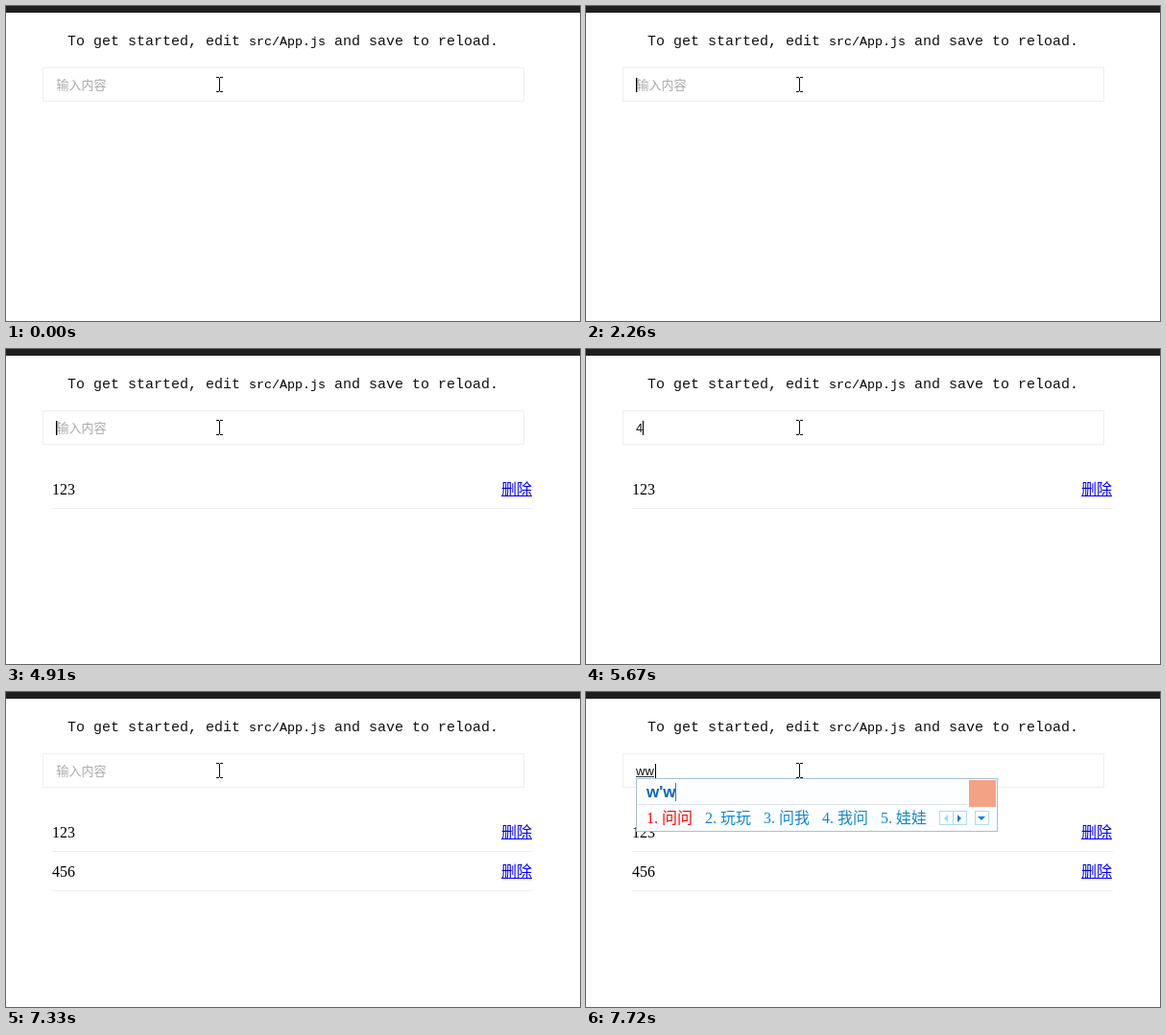
An HTML page that plays this animation: 598x329 px, repeating every 8000 ms.

```html
<!DOCTYPE html>
<html lang="en">
<head>
<meta charset="utf-8">
<title>Todo input</title>
<style>
html, body { margin: 0; width: 100%; height: 100%; overflow: hidden; background: #fff; }
svg { display: block; width: 598px; height: 329px; }
.head { font: 15px "Liberation Mono", monospace; fill: #111; }
.code { font-size: 13.333px; fill: #000; }
.body { font: 16px "Liberation Serif", "Noto Sans CJK SC", "Noto Sans CJK", serif; }
.field { font: 13px "Liberation Sans", "Noto Sans CJK SC", "Noto Sans CJK", sans-serif; }
.pinyin { font: bold 17px "Liberation Sans", sans-serif; }
</style>
</head>
<body>
<svg viewBox="0 0 598 329">
  <rect width="598" height="7" fill="#201e1f"/>
  <g class="head">
    <text x="64" y="41">To get started, edit</text>
    <text x="253" y="41" class="code">src/App.js</text>
    <text x="342" y="41">and save to reload.</text>
  </g>
  <rect x="38.5" y="64.5" width="501" height="35" fill="#fff" stroke="#eee"/>
  <g id="live"></g>
  <path d="M219 74.5h3m1 0h3M219 89.5h3m1 0h3M222.5 75v14" fill="none" stroke="#111"/>
</svg>
<script>
const LOOP = 8000;
const HINT = "输入内容";
const POP_W = { typed: "w", width: 297, caret: 76, color: "#f00", pitch: 45, words: "我 位 万 蚊 为" };
const POP_WW = { typed: "w'w", width: 377, caret: 93, color: "#f00", pitch: 61, words: "问问 玩玩 问我 我问 娃娃" };
const POP_IDLE = { ...POP_WW, color: "#4a74a8" };

// [start ms, field text, caret shown, list rows, candidate popup]
const STEPS = [
  [0, "", 0, []], [1240, "", 1, []], [1800, "", 0, []], [2260, "", 1, []], [2840, "", 0, []],
  [3400, "1", 1, []], [3650, "12", 1, []], [3800, "123", 1, []],
  [4360, "123", 0, []], [4760, "123", 1, []],
  [4910, "", 1, ["123"]], [5370, "", 0, ["123"]],
  [5670, "4", 1, ["123"]], [5790, "45", 1, ["123"]], [5940, "456", 1, ["123"]], [6530, "456", 0, ["123"]],
  [6810, "", 1, ["123", "456"]], [7330, "", 0, ["123", "456"]],
  [7480, "w", 1, ["123", "456"], POP_W],
  [7600, "ww", 1, ["123", "456"], POP_WW],
  [7720, "ww", 1, ["123", "456"], POP_IDLE]
];

const rect = (x, y, w, h, fill, more = "") =>
  `<rect x="${x}" y="${y}" width="${w}" height="${h}" fill="${fill}" ${more}/>`;

const label = (kind, text, x, y, fill) =>
  `<text class="${kind}" x="${x}" y="${y}" fill="${fill}">${text}</text>`;

function field(text, caret, composing) {
  let out = text ? label("field", text, 52, 87, "#111") : label("field", HINT, 52.5, 87, "#a9a9a9");
  const end = 52 + text.length * (composing ? 10 : 7);
  if (composing) out += rect(52, 88, end - 53, 1, "#333");
  if (caret) out += rect(end, 75, 1, 15, "#000");
  if (caret && !text) out += rect(53, 75, 1, 15, "#999");
  return out;
}

function row(text, i) {
  const y = 152 + 41 * i;
  return label("body", text, 48, y, "#000") + label("body", "删除", 516, y, "#00e") +
    rect(516, y + 1, 32, 1, "#00e") + rect(48, y + 14, 501, 1, "#eee");
}

function candidate(word, i, pitch) {
  const x = 63 + pitch * i;
  const fill = i ? "#1286d0" : "#f00";
  return label("body", `${i + 1}.`, x, 137, fill) + label("body", word, x + 16, 137, fill);
}

function popup(p) {
  const right = 52 + p.width;
  const button = x => rect(x + 0.5, 124.5, 14, 14, "#f8fcff", 'stroke="#b4d9ef"');
  const words = p.words.split(" ").map((w, i) => candidate(w, i, p.pitch));
  return rect(52.5, 90.5, p.width - 1, 55, "#fcfeff", 'stroke="#a9bfcf"') +
    rect(53, 117, p.width - 33, 1, "#dde3e6") +
    label("pinyin", p.typed, 63, 110, "#0a64b8") +
    rect(p.caret, 95, 1, 19, p.color) + words.join("") +
    button(right - 61) + button(right - 47) + button(right - 24) +
    `<path d="M${right - 52} 128v8l-4-4z" fill="#a8d4ef"/>` +
    `<path d="M${right - 42} 128v8l4-4z" fill="#0b7fcb"/>` +
    `<path d="M${right - 21} 130h8l-4 4z" fill="#0b7fcb"/>` +
    rect(right - 30, 92, 28, 28, "#f4a285");
}

const live = document.getElementById("live");
let shown = -1;

function render(t) {
  const n = STEPS.findLastIndex(s => s[0] <= t);
  if (n === shown) return;
  shown = n;
  const [, text, caret, rows, pop] = STEPS[n];
  live.innerHTML = field(text, caret, pop) + rows.map(row).join("") + (pop ? popup(pop) : "");
}

const start = performance.now();
function tick() {
  render((performance.now() - start) % LOOP);
  requestAnimationFrame(tick);
}
tick();
</script>
</body>
</html>
```
